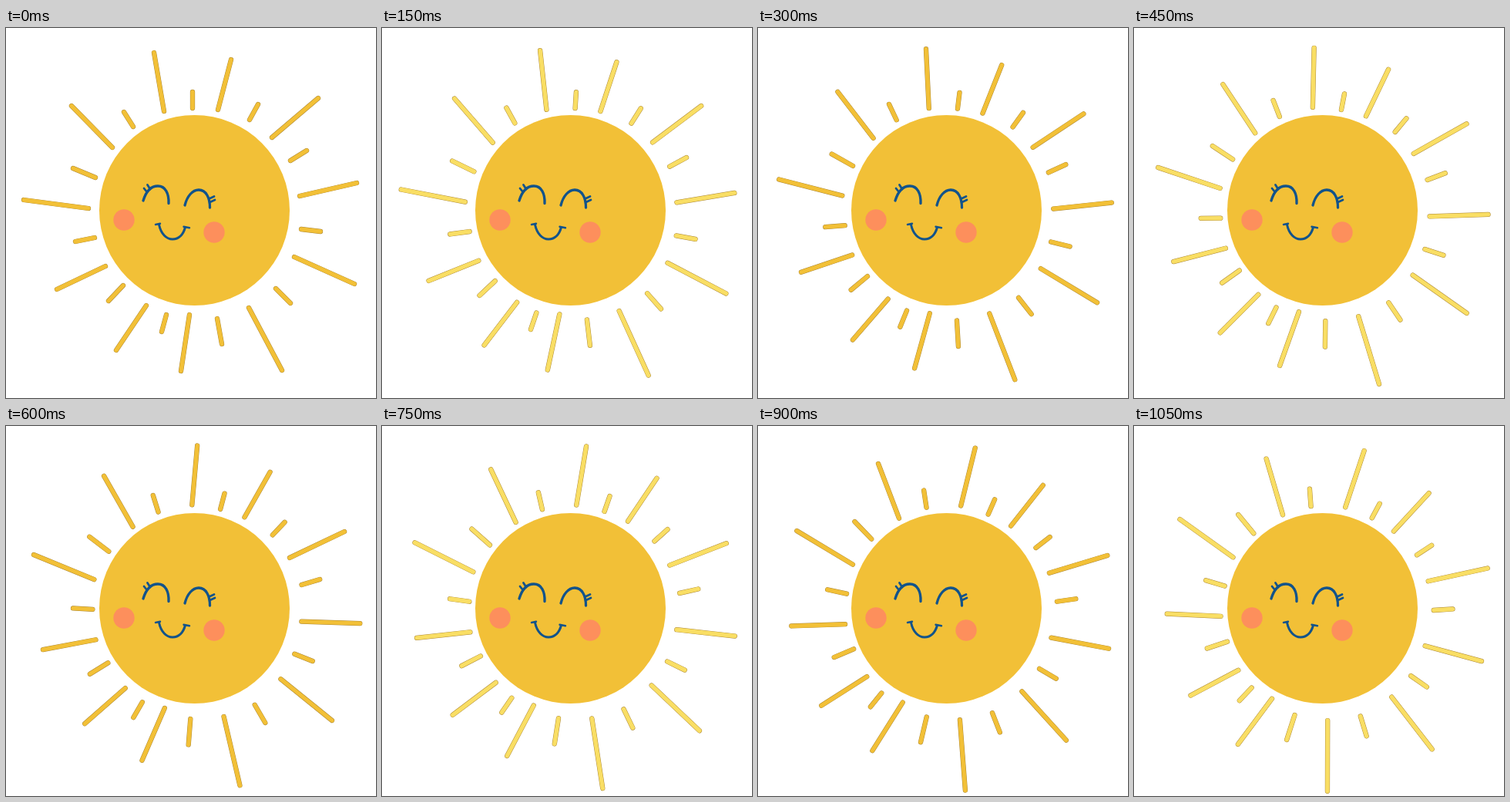
Animation of 480x480 px, one loop 1200 ms. Source, as an HTML page:

```html
<!DOCTYPE html>
<html lang="en">
<head>
<meta charset="utf-8">
<title>Smiling sun</title>
<style>
  html, body { margin: 0; width: 100%; height: 100%; overflow: hidden; background: #fff; }
  svg { display: block; width: 100%; height: 100%; }
  path { fill: none; stroke-linecap: round; stroke-linejoin: round; }
</style>
</head>
<body>
<svg viewBox="0 0 480 480">
  <g id="rays">
    <path id="edge" stroke="#a98432" stroke-width="6.3"/>
    <path id="fill" stroke-width="5.4"/>
  </g>
  <circle cx="244.5" cy="236.5" r="123.5" fill="#f2c037"/>
  <g fill="#fd8f5c">
    <circle cx="153" cy="249" r="13.7"/>
    <circle cx="270" cy="265" r="13.7"/>
  </g>
  <g stroke="#12538a">
    <path stroke-width="3.3" d="M178 224C182 211 189 205 197 205C207 205 211.500 215 211 227.500
      M232 230C235 218 242 210 250 210C260 210 264.500 221 264.500 233"/>
    <path stroke-width="2.8" d="M183 213L179 208M187 209L183.500 203.500
      M263.500 221.500L270 218.500M264.500 226L271 223"/>
    <path stroke-width="3" d="M198.500 255C201 267 208 274 216 274C224 274 230 268 232.500 258.500"/>
    <path stroke-width="2.4" d="M194 255L200 253.800M230.500 257.800L238 259.300"/>
  </g>
</svg>
<script>
  // Each ray runs from its outer to its inner end, clockwise from the top.
  const longRays = [
    [192, 32, 205, 108], [292, 41, 275, 106], [405, 91, 345, 142], [455, 201, 381, 218],
    [452, 332, 374, 297], [358, 444, 315, 363], [227, 445, 238, 372], [143, 418, 182, 360],
    [66, 339, 129, 309], [23, 223, 107, 234], [85, 101, 138, 155]
  ];
  const shortRays = [
    [242, 83, 242, 104], [327, 99, 316, 119], [390, 159, 369, 172], [408, 264, 383, 261],
    [369, 357, 350, 338], [280, 410, 274, 377], [202, 394, 208, 372], [133, 354, 152, 334],
    [90, 277, 115, 272], [87, 182, 116, 194], [153, 109, 165, 128]
  ];
  const angles = [0, 3.5, 6.9, 11, 14.8, 19.2, 23.6, 28.1];
  const colors = ["#f2c037", "#f9de64"];
  const stepMs = 150;

  const rays = document.getElementById("rays");
  const edge = document.getElementById("edge");
  const fill = document.getElementById("fill");
  const outline = [...longRays, ...shortRays]
    .map(([x1, y1, x2, y2]) => `M${x1} ${y1}L${x2} ${y2}`).join("");
  edge.setAttribute("d", outline);
  fill.setAttribute("d", outline);

  function draw(time) {
    const step = Math.floor(time / stepMs) % angles.length;
    rays.setAttribute("transform", `rotate(${angles[step]} 245 245)`);
    fill.setAttribute("stroke", colors[step % 2]);
  }

  const start = performance.now();
  function tick() {
    draw(performance.now() - start);
    requestAnimationFrame(tick);
  }
  tick();
</script>
</body>
</html>
```
